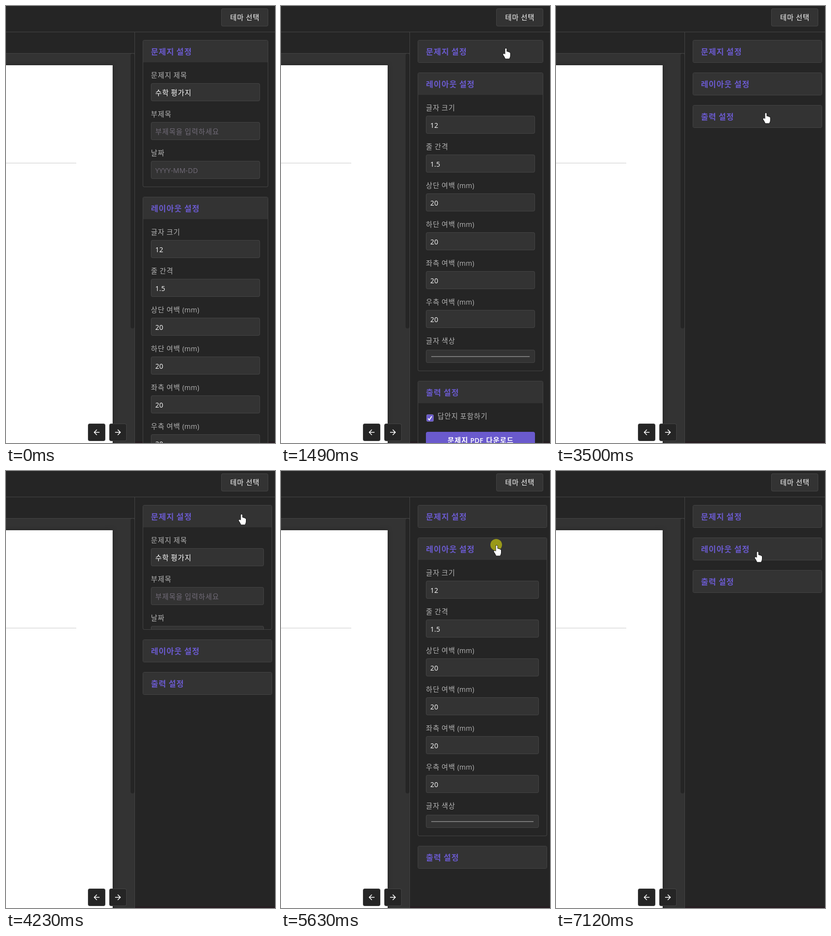
These frames come from a looping animation (555 px wide and 900 px high, 7.15 s). An HTML page with a canvas:

```html
<!DOCTYPE html>
<html lang="ko">
<head>
<meta charset="utf-8">
<title>문제지 설정</title>
<style>
html, body { margin: 0; width: 100%; height: 100%; overflow: hidden; background: #252525; }
canvas { display: block; width: 555px; height: 900px; }
</style>
</head>
<body>
<canvas id="stage" width="555" height="900"></canvas>
<script>
const ctx = document.getElementById('stage').getContext('2d');
const LOOP = 7150;
const SLIDE = 300;
const DARK = '#252525', RAISED = '#333333', LINE = '#444444';
const PURPLE = '#6a5acd', LABEL = '#b3b3b3', WHITE = '#ffffff', HINT = '#716b78';

const HAND = new Path2D('M-0.5 1Q1 -0.5 2.5 1V7Q4 5.5 5.5 8Q7 6.5 8 8.8Q10 8 10 11V15Q10 18 8 21.5H0Q-1.5 17.5 -5 13Q-4 10 -0.5 12.5Z');
const ARROW = new Path2D('M0 0V16L3.7 12.6L6.2 18.4L8.8 17.3L6.4 11.6H11.5Z');

// Mouse press, release, and the section it toggles
const clicks = [
  [1100, 1190, 0], [1910, 2000, 1], [2690, 2800, 2],
  [3985, 4075, 0], [4400, 4495, 0], [5035, 5090, 1],
  [5630, 5700, 1], [6360, 6440, 2], [6675, 6755, 2]
];

// Pointer stops: time, x, y
const stops = [
  [100, -12, 352], [820, 460, 91], [1000, 463, 87], [1690, 463, 87],
  [1900, 445, 153], [2030, 445, 153], [2400, 438, 200], [2460, 431, 222],
  [3470, 431, 222], [3950, 485, 89], [4580, 485, 89], [4940, 444, 153],
  [5720, 444, 153], [6300, 425, 222], [6760, 425, 222], [7060, 416, 219],
  [7125, 415, 165]
];

const sections = [
  { title: '문제지 설정', body: 256, draw: drawSheet },
  { title: '레이아웃 설정', body: 568, draw: drawLayout },
  { title: '출력 설정', body: 251, draw: drawOutput }
];

const clamp = v => Math.max(0, Math.min(1, v));
const smooth = v => v * v * (3 - 2 * v);

// cubic-bezier(.25, .1, .25, 1)
function ease(x) {
  if (x <= 0 || x >= 1) return clamp(x);
  let lo = 0, hi = 1, s;
  for (let i = 0; i < 20; i++) {
    s = (lo + hi) / 2;
    const at = 0.75 * s * (1 - s) + s ** 3;
    if (at < x) lo = s; else hi = s;
  }
  return 0.3 * (1 - s) ** 2 * s + 3 * (1 - s) * s * s + s ** 3;
}

function openness(index, time) {
  let open = 1, value = 1;
  for (const [, release, target] of clicks) {
    if (target !== index || time < release) continue;
    open = 1 - open;
    const p = ease((time - release) / SLIDE);
    value = open ? p : 1 - p;
  }
  return value;
}

function pointerAt(time) {
  const next = stops.findIndex(s => s[0] > time);
  if (next === 0) return stops[0].slice(1);
  if (next < 0) return stops[stops.length - 1].slice(1);
  const [t0, x0, y0] = stops[next - 1], [t1, x1, y1] = stops[next];
  const p = smooth((time - t0) / (t1 - t0));
  return [x0 + (x1 - x0) * p, y0 + (y1 - y0) * p];
}

function rect(x, y, w, h, color) {
  ctx.fillStyle = color;
  ctx.fillRect(x, y, w, h);
}

function box(x, y, w, h, fill, border, radius = 4) {
  ctx.beginPath();
  ctx.roundRect(x, y, w, h, radius);
  ctx.fillStyle = border || fill;
  ctx.fill();
  if (!border) return;
  ctx.beginPath();
  ctx.roundRect(x + 1, y + 1, w - 2, h - 2, radius - 1);
  ctx.fillStyle = fill;
  ctx.fill();
}

// Hangul and Latin runs use different faces; align is 0 for left, 0.5 for centre
function text(str, x, baseline, color, { size = 14.4, weight = 400, align = 0 } = {}) {
  const runs = str.match(/[가-힣]+|[^가-힣]+/g);
  const setRun = run => {
    const hangul = /[가-힣]/.test(run);
    const face = hangul ? '"Noto Sans CJK KR", "Noto Sans CJK JP"' : '"Open Sans", "Noto Sans"';
    ctx.font = `${weight} ${hangul ? size : size - 0.4}px ${face}, sans-serif`;
    ctx.letterSpacing = hangul ? '1px' : '0.2px';
    ctx.wordSpacing = '2px';
    return ctx.measureText(run).width;
  };
  x -= align * runs.reduce((sum, run) => sum + setRun(run), 0);
  ctx.fillStyle = color;
  for (const run of runs) {
    const w = setRun(run);
    ctx.fillText(run, x, baseline);
    x += w;
  }
}

function field(label, value, y, w, color = WHITE) {
  text(label, 299, y + 78, LABEL);
  box(299, y + 89, w - 34, 37, RAISED, LINE);
  text(value, 308, y + 114, color);
}

function drawSheet(y, w) {
  field('문제지 제목', '수학 평가지', y, w);
  field('부제목', '부제목을 입력하세요', y + 80, w, HINT);
  field('날짜', 'YYYY-MM-DD', y + 160, w, HINT);
}

function drawLayout(y, w) {
  const margins = ['상단', '하단', '좌측', '우측'].map(side => [side + ' 여백 (mm)', '20']);
  [['글자 크기', '12'], ['줄 간격', '1.5'], ...margins]
    .forEach(([label, value], i) => field(label, value, y + i * 80, w));
  text('글자 색상', 299, y + 558, LABEL);
  box(299, y + 571, w - 34, 27, RAISED, LINE);
  rect(310, y + 584, w - 56, 2, '#777777');
}

function drawOutput(y, w) {
  box(300, y + 69, 15, 15, PURPLE, '#7a70b4', 3);
  ctx.strokeStyle = WHITE;
  ctx.lineWidth = 2;
  ctx.beginPath();
  ctx.moveTo(303.5, y + 77.5);
  ctx.lineTo(306, y + 80.5);
  ctx.lineTo(311, y + 73);
  ctx.stroke();
  text('답안지 포함하기', 323, y + 78, LABEL);
  const buttons = [
    ['문제지 PDF 다운로드', 105, 35], ['정답지 PDF 다운로드', 152, 35],
    ['템플릿 저장하기', 199, 37], ['템플릿 불러오기', 248, 37]
  ];
  buttons.forEach(([label, top, h], i) => {
    box(299, y + top, w - 34, h, i < 2 ? PURPLE : RAISED, i < 2 ? null : LINE);
    text(label, 282.5 + w / 2, Math.floor(y + top + h / 2 + 6), WHITE, { weight: 600, align: 0.5 });
  });
}

function drawSection({ title, draw }, y, w, bodyHeight) {
  const h = 47 + bodyHeight;
  box(282, y, w, h, DARK, LINE);
  ctx.save();
  ctx.beginPath();
  ctx.roundRect(283, y + 1, w - 2, h - 2, 3);
  ctx.clip();
  rect(283, y + 1, w - 2, 45, RAISED);
  if (bodyHeight > 0) {
    ctx.beginPath();
    ctx.rect(283, y + 46, w - 2, bodyHeight);
    ctx.save();
    ctx.clip();
    draw(y, w);
    ctx.restore();
  }
  text(title, 299, y + 30, PURPLE, { size: 16.4, weight: 700 });
  ctx.restore();
}

function navButton(x, direction) {
  box(x, 860, 36, 36, DARK, LINE);
  const cx = x + 18, tip = cx + 5 * direction;
  ctx.strokeStyle = WHITE;
  ctx.lineWidth = 1.5;
  ctx.beginPath();
  ctx.moveTo(cx - 6 * direction, 878);
  ctx.lineTo(tip, 878);
  ctx.moveTo(tip - 5.5 * direction, 872.5);
  ctx.lineTo(tip, 878);
  ctx.lineTo(tip - 5.5 * direction, 883.5);
  ctx.stroke();
}

function drawWorkspace() {
  rect(0, 0, 555, 900, DARK);
  rect(0, 98, 265, 802, RAISED);
  ctx.save();
  ctx.shadowColor = 'rgba(0,0,0,.3)';
  ctx.shadowBlur = 10;
  rect(-20, 122, 240, 800, WHITE);
  ctx.restore();
  rect(0, 323, 145, 1, '#cccccc');
  rect(0, 98, 265, 1, RAISED);
  box(257, 98, 8, 566, DARK);
  rect(0, 53, 555, 1, LINE);
  rect(0, 97, 265, 1, LINE);
  rect(265, 54, 1, 846, LINE);
  navButton(169, -1);
  navButton(213, 1);
  box(444, 5, 97, 37, RAISED, LINE);
  text('테마 선택', 493, 29, WHITE, { align: 0.5 });
  rect(266, 897, 289, 3, '#251c20');
}

function drawPointer(time, tops, w) {
  const [x, y] = pointerAt(time);
  if (clicks.some(([press, release]) => time >= press && time < release)) {
    ctx.fillStyle = 'rgba(255,255,0,.5)';
    ctx.beginPath();
    ctx.arc(x, y - 1, 12, 0, Math.PI * 2);
    ctx.fill();
  }
  const onHeader = x >= 282 && x < 282 + w && tops.some(top => y >= top && y < top + 47);
  const shape = onHeader ? HAND : ARROW;
  ctx.save();
  ctx.translate(Math.round(x), Math.round(y));
  ctx.lineWidth = 1.4;
  ctx.lineJoin = 'round';
  ctx.strokeStyle = '#000000';
  ctx.stroke(shape);
  ctx.fillStyle = WHITE;
  ctx.fill(shape);
  ctx.restore();
}

function render(time) {
  drawWorkspace();
  const heights = sections.map((s, i) => Math.round(s.body * openness(i, time)));
  const tops = [];
  let y = 70;
  for (const h of heights) {
    tops.push(y);
    y += h + 67;
  }
  // An overflowing panel gives up 8px to its scrollbar
  const w = y - 20 > 880 ? 259 : 267;
  sections.forEach((s, i) => drawSection(s, tops[i], w, heights[i]));
  if (time >= 100) drawPointer(time, tops, w);
}

const start = performance.now();
function tick() {
  render((performance.now() - start) % LOOP);
  requestAnimationFrame(tick);
}
tick();
</script>
</body>
</html>
```
